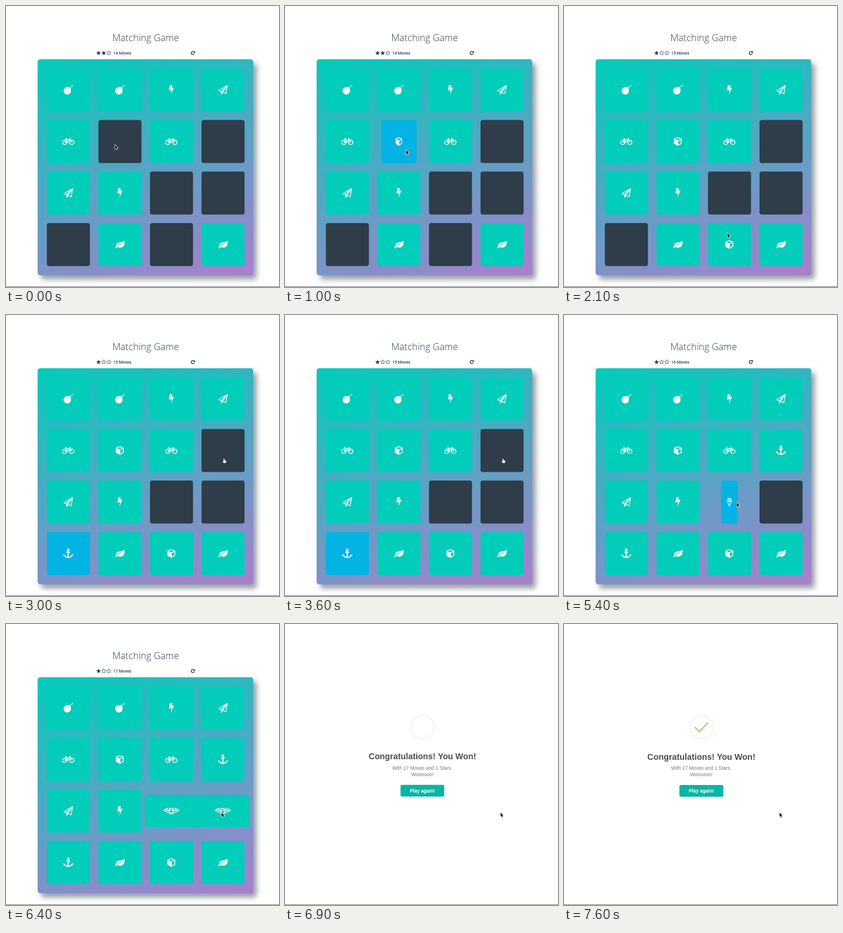
These frames come from a looping animation (466x480 px, 8000 ms). An HTML page with a canvas:

```html
<!DOCTYPE html>
<html lang="en">
<head>
<meta charset="utf-8">
<title>Matching Game</title>
<style>
html, body { margin: 0; width: 100%; height: 100%; overflow: hidden; background: #fff; }
canvas { display: block; width: 466px; height: 480px; }
</style>
</head>
<body>
<canvas id="stage"></canvas>
<script>
const LOOP = 8000, W = 466, H = 480;
const DARK = '#2e3d49', OPEN = '#02b3e4', MATCH = '#02ccba';
const canvas = document.getElementById('stage');
const ctx = canvas.getContext('2d');
const dpr = window.devicePixelRatio || 1;
canvas.width = W * dpr;
canvas.height = H * dpr;

const clamp = v => Math.max(0, Math.min(1, v));
const lerp = (a, b, p) => a + (b - a) * p;
const ease = p => p * p * (3 - 2 * p);

// Value of a keyframed track: rows of [time, ...values]
function track(keys, t, curve = ease) {
  if (t <= keys[0][0]) return keys[0].slice(1);
  for (let i = 1; i < keys.length; i++) {
    const a = keys[i - 1], b = keys[i];
    if (t <= b[0]) {
      const p = curve((t - a[0]) / (b[0] - a[0]));
      return a.slice(1).map((v, k) => lerp(v, b[k + 1], p));
    }
  }
  return keys[keys.length - 1].slice(1);
}

// Timeline
const FLIP = 400, BAND = 400, WIN = 6800;
const turns = {
  cube: { first: 680, second: 1750 },
  anchor: { first: 2430, second: 3790 },
  diamond: { first: 5150, second: 6100 }
};
const deck = [
  'bomb', 'bomb', 'bolt', 'plane',
  'bike', 'cube', 'bike', 'anchor',
  'plane', 'bolt', 'diamond', 'diamond',
  'anchor', 'leaf', 'cube', 'leaf'
];
const openedFirst = [5, 12, 10];
const bandKeys = [[0, 1, 1], [300, 1.25, .75], [400, .75, 1.25]];
const pointerKeys = [
  [500, 186, 237], [1000, 207, 246], [1100, 207, 247], [1600, 284, 399],
  [1850, 284, 399], [2100, 279, 388], [2400, 108, 404], [2550, 108, 404],
  [3000, 372, 245], [3850, 372, 245], [4200, 405, 209], [4380, 405, 209],
  [4950, 286, 320], [5300, 286, 320], [5800, 368, 322]
];
const handTimes = [[550, 680], [1500, 1750], [2360, 2430], [2940, 3790], [4700, 5150], [5600, 6100]];

// Drawing helpers
function fillBox(x, y, w, h, r, color) {
  ctx.beginPath();
  ctx.roundRect(x, y, w, h, r);
  ctx.fillStyle = color;
  ctx.fill();
}
function write(str, x, y, font, color, align = 'center') {
  ctx.font = font;
  ctx.fillStyle = color;
  ctx.textAlign = align;
  ctx.fillText(str, x, y);
}
function shape(d, width) {
  const path = new Path2D(d);
  if (width) { ctx.lineWidth = width; ctx.stroke(path); }
  else ctx.fill(path);
}
function disc(x, y, r, width) {
  ctx.beginPath();
  ctx.arc(x, y, r, 0, 7);
  if (width) { ctx.lineWidth = width; ctx.stroke(); }
  else ctx.fill();
}

const icons = {
  bomb() {
    disc(-1.6, 1.6, 6.3);
    shape('M0-4 2-5.6 5-2.6 3.4-.6Z');
    shape('M3.4-4.2Q5-6.4 6.4-6', 1);
    shape('M7-8.4V-7M8.6-6.6H7.6M5.4-8 6-7.2M8.4-8 7.6-7.2M7.6-5.8 8.2-5.2', .8);
  },
  bolt() { shape('M-2.5-8H2L.6-3.4 4.6-4.2-.8 8.4.8.2-3.9 1.3Z'); },
  plane() {
    shape('M7.6-7.6-7.2 1.2-2.8 3.4 7.6-7.6 5 6.6-.6 4.2M7.6-7.6-.6 4.2-2.6 7.6V3.4', 1.3);
  },
  bike() {
    disc(-6, 1.6, 3.7, 1.4);
    disc(6, 1.6, 3.7, 1.4);
    shape('M-6 1.6-3-3H3L-.6 1.6H-6M-3.6-4.4-.6 1.6M6 1.6 2.4-5H4.6M-5-4.6H-2', 1.2);
  },
  cube() {
    shape('M0-7.2 6.6-4.6V4L0 7.4-6.6 4V-4.6ZM0-5.8-5-3.9 0-2 5-3.9ZM.9-.8V5.4L5.2 3.2V-2.5Z');
  },
  leaf() {
    shape('M8-6.4C8.8-1 7.6 3.8 2.4 5.2-.6 6-3 4.8-4.2 4.8-5.4 4.8-5.8 6.8-7 6.6-8.6 6-7.6 4.4-6 3.2-7.4-1.6-3.4-3.4 1-3.6 5-3.8 5.6-5 8-6.4Z');
    ctx.strokeStyle = MATCH;
    shape('M-5 3.2Q-1.8-.8 3.6-1', 1.1);
  },
  anchor() {
    disc(0, -6, 1.7, 1.4);
    shape('M0-4V6.4M-3.2-2H3.2', 2);
    shape('M-6.4 2.6Q-5.2 6.6 0 6.8 5.2 6.6 6.4 2.6', 1.9);
    shape('M-8.2 5V1L-4.6 3.6ZM8.2 5V1L4.6 3.6Z');
  },
  diamond() {
    shape('M-6.6-6H6.6L10.4-1.2 0 7.4-10.4-1.2ZM-10.4-1.2H10.4M-6.6-6-4-1.2 0 7.4 4-1.2 6.6-6M-4-1.2 0-6 4-1.2', 1.15);
  }
};

function drawCard(i, t) {
  const name = deck[i], turn = turns[name];
  let color = MATCH, sx = 1, sy = 1, shown = true;
  if (turn) {
    const start = openedFirst.includes(i) ? turn.first : turn.second;
    const since = t - turn.second;
    if (t < start) {
      color = DARK;
      shown = false;
    } else if (since < 0) {
      const p = clamp((t - start) / FLIP);
      sx = Math.max(.02, Math.abs(Math.cos(Math.PI * (1 - p))));
      shown = p > .5;
      color = shown ? OPEN : DARK;
    } else if (since < BAND) {
      [sx, sy] = track(bandKeys, since);
    }
  }
  ctx.save();
  ctx.translate(106.5 + 88 * (i % 4), 143.5 + 88 * Math.floor(i / 4));
  ctx.scale(sx, sy);
  fillBox(-36.75, -36.75, 73.5, 73.5, 4, color);
  if (shown) {
    ctx.fillStyle = ctx.strokeStyle = '#fff';
    ctx.lineJoin = 'round';
    ctx.translate(-.3, -.2);
    icons[name]();
  }
  ctx.restore();
}

function drawStar(x, full) {
  ctx.beginPath();
  for (let k = 0; k < 10; k++) {
    const r = k % 2 ? 1.8 : (full ? 4.3 : 3.9), a = k * Math.PI / 5 - Math.PI / 2;
    ctx.lineTo(x + r * Math.cos(a), 80.4 + r * Math.sin(a));
  }
  ctx.closePath();
  ctx.fillStyle = ctx.strokeStyle = DARK;
  ctx.lineWidth = .7;
  if (full) ctx.fill(); else ctx.stroke();
}

function drawHeader(t) {
  const played = Object.values(turns).filter(v => t >= v.second).length;
  write('Matching Game', 238.4, 60, '300 16.1px "Open Sans", sans-serif', DARK);
  for (let k = 0; k < 3; k++) drawStar(158 + 8.8 * k, k < (played ? 1 : 2));
  write(14 + played + ' Moves', 183, 83, '500 7.1px Roboto, sans-serif', DARK, 'left');
  ctx.beginPath();
  ctx.arc(319, 80.3, 2.7, .5, 5.5);
  ctx.lineWidth = 1.3;
  ctx.strokeStyle = ctx.fillStyle = DARK;
  ctx.stroke();
  shape('M322.6 76.8V80.2H319.2Z');
}

function drawBoard() {
  const g = ctx.createLinearGradient(157.3, 53.8, 318.7, 497.2);
  g.addColorStop(0, '#02ccba');
  g.addColorStop(1, '#aa7ecd');
  ctx.save();
  ctx.shadowColor = 'rgba(46,61,73,.5)';
  ctx.shadowBlur = 10 * dpr;
  ctx.shadowOffsetX = 6 * dpr;
  ctx.shadowOffsetY = 7 * dpr;
  fillBox(54, 91, 368, 369, 4.5, g);
  ctx.restore();
}

function drawCheck(p) {
  disc(235, 176, 20, 0);
  ctx.strokeStyle = '#f1f2ef';
  disc(235, 176, 20, 2);
  const [tip] = track([[.54, 0], [.7, 1.7], [.84, .7], [1, 1]], p);
  const [long] = track([[.65, 0], [.84, 1.15], [1, 1]], p);
  ctx.strokeStyle = '#a5dc86';
  ctx.lineCap = 'round';
  ctx.lineWidth = 2.6;
  ctx.beginPath();
  if (tip > 0) {
    const k = Math.min(tip, 1);
    ctx.moveTo(223.8, 176.6);
    ctx.lineTo(223.8 + 7.2 * k, 176.6 + 7.4 * k);
  }
  if (long > 0) {
    ctx.moveTo(231, 184);
    ctx.lineTo(231 + 14.6 * long, 184 - 15.4 * long);
  }
  ctx.stroke();
}

function drawDialog(t) {
  const since = t - WIN, sans = '"Liberation Sans", Arial, sans-serif';
  const [s] = track([[0, .7], [135, 1.05], [240, .95], [300, 1]], since);
  ctx.save();
  ctx.globalAlpha = clamp(since / 90);
  ctx.fillStyle = '#fff';
  ctx.fillRect(0, 0, W, H);
  ctx.translate(234.5, 226);
  ctx.scale(s, s);
  ctx.translate(-234.5, -226);
  drawCheck(clamp(since / 750));
  write('Congratulations! You Won!', 234.5, 231.5, `bold 14.35px ${sans}`, '#4c4c50');
  write('With 17 Moves and 1 Stars.', 234.3, 249.3, `8.4px ${sans}`, '#77777a');
  write('Woooooo!', 234.3, 260.3, `8.4px ${sans}`, '#77777a');
  fillBox(197, 275, 75, 20, 2.5, '#06b5a5');
  write('Play again!', 234.5, 288, `bold 8.2px ${sans}`, '#fff');
  ctx.restore();
}

function drawPointer(t) {
  const [x, y] = track(pointerKeys, t);
  const hand = handTimes.some(([a, b]) => t >= a && t < b);
  ctx.save();
  ctx.translate(x, y);
  ctx.lineJoin = 'round';
  if (hand) {
    ctx.fillStyle = '#fff';
    ctx.strokeStyle = '#111';
    const d = 'M-.6 .4Q.2-.4 .9 .4V3L3.6 3.6Q4.3 4 4 5.4L3.2 8H-.4L-2.4 5Q-2.2 4-.6 5Z';
    shape(d, .9);
    shape(d);
  } else {
    const d = 'M0 0V7.2L1.6 5.8 2.7 8.4 3.9 7.9 2.8 5.3H4.9Z';
    ctx.strokeStyle = '#fff';
    ctx.fillStyle = '#111';
    shape(d, 1.3);
    shape(d);
  }
  ctx.restore();
}

function draw(t) {
  ctx.setTransform(dpr, 0, 0, dpr, 0, 0);
  ctx.fillStyle = '#fff';
  ctx.fillRect(0, 0, W, H);
  if (t < WIN + 90) {
    drawHeader(t);
    drawBoard();
    deck.forEach((name, i) => drawCard(i, t));
  }
  if (t >= WIN) drawDialog(t);
  ctx.fillStyle = '#e4e4e4';
  ctx.fillRect(0, 478, W, 1);
  ctx.fillStyle = '#9a9a9a';
  ctx.fillRect(0, 479, W, 1);
  drawPointer(t);
}

const begin = performance.now();
function frame() {
  draw((performance.now() - begin) % LOOP);
  requestAnimationFrame(frame);
}
frame();
</script>
</body>
</html>
```
